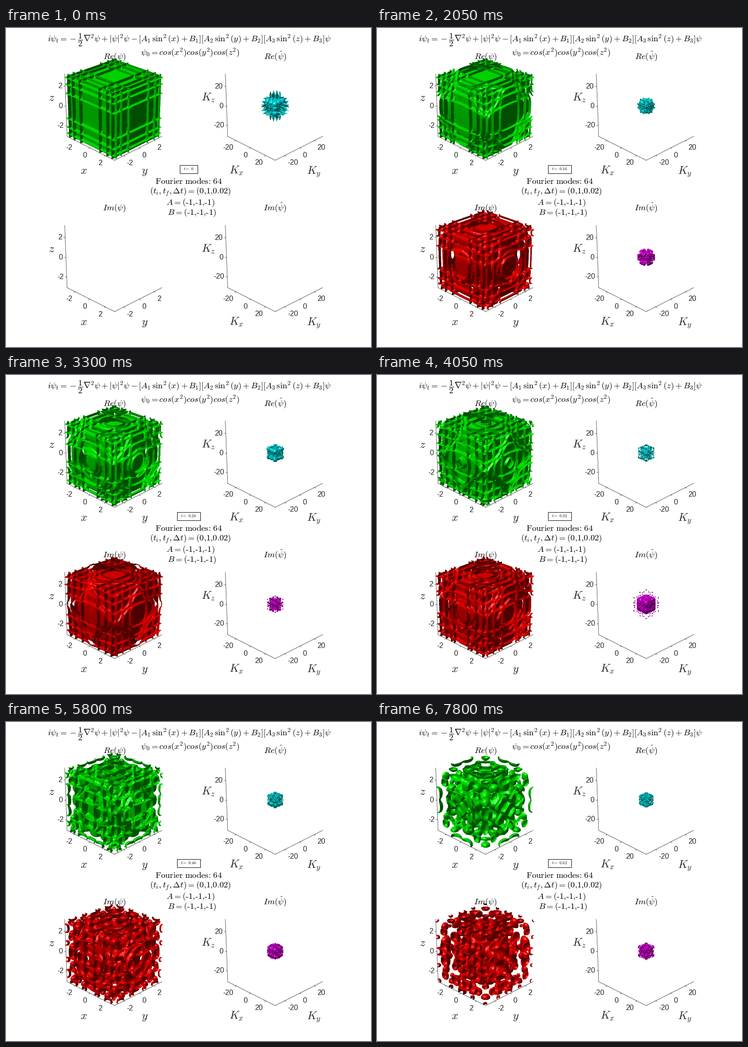
Animation, 800 px wide and 700 px high, one loop 8 s. Source, as a matplotlib script:

```python
import itertools
import numpy as np
import matplotlib.pyplot as plt
from matplotlib.animation import FuncAnimation
from matplotlib.patches import Rectangle

plt.rcParams["mathtext.fontset"] = "cm"
plt.rcParams["font.family"] = "Liberation Sans"

# ---------- wave equation on the even half grid ----------
N, H = 64, 32
STATES, DT, SUB = 32, 0.02, 2
k = np.fft.fftfreq(N, 1 / N)
x = np.arange(H + 1) * 2 * np.pi / N


def fold(m):
    """Restrict a matrix on N periodic points to even functions."""
    f = m[:H + 1, :H + 1].copy()
    f[:, 1:H] += m[:H + 1, :H:-1]
    return f


def apply3(m, a):
    for _ in range(3):
        a = np.tensordot(a, m, (0, 1))
    return a


def outer3(v):
    return v[:, None, None] * v[:, None] * v


step = DT / SUB
dft = np.fft.fft(np.eye(N))
kinetic = fold(np.fft.ifft(np.exp(-0.5j * k**2 * step)[:, None] * dft, axis=0))
fourier = fold(dft).real * ((-1.0) ** np.arange(H + 1))[:, None]
potential = outer3(1 + np.sin(x) ** 2)


def half_kick(psi):
    return psi * np.exp(-0.5j * step * (np.abs(psi) ** 2 + potential))


def advance(psi):
    for _ in range(SUB):
        psi = half_kick(apply3(kinetic, half_kick(psi)))
    return psi


# ---------- camera and light ----------
EL = np.radians(25)
S, C, R = np.sin(EL), np.cos(EL), np.sqrt(0.5)
DIST, FOCAL = 10 * np.sqrt(3), 1306
VIEW = np.array([[R, R, 0], [-S * R, S * R, C], [C * R, -C * R, S]], np.float32)
LIGHT = np.array([-0.065, -0.496, 0.866], np.float32)
EYE = VIEW[2]
LEFT, TOP, WIDE, TALL = 112, 112, 224, 240
SIGNS = np.array(list(itertools.product((-1, 1), repeat=3)), np.float32)[:, None]


def project(p):
    a, v, w = VIEW @ np.asarray(p, np.float32).T
    s = FOCAL / (DIST - w)
    return a * s, -v * s, w


# ---------- isosurfaces ----------
mirror = np.abs(np.arange(-H, H))


def isovalue(a):
    """Middle bar of the well filled part of a histogram."""
    full = a[np.ix_(mirror, mirror, mirror)].ravel()[::26]
    n, edges = np.histogram(full, 100)
    mid = (edges[1:] + edges[:-1]) / 2
    if n.argmax() < 2 and n[:2].max() > 10 * n.mean():
        n, mid = n[2:], mid[2:]
    small = n < n.max() / 50
    if small.sum() < 90:
        mid = mid[~small]
    return mid[max(len(mid) // 2 - 1, 0)]


def refine(a):
    for _ in range(3):
        b = np.empty((2 * len(a) - 1,) + a.shape[1:], np.float32)
        b[::2] = a
        b[1::2] = (a[1:] + a[:-1]) / 2
        a = np.moveaxis(b, 0, -1)
    return np.ascontiguousarray(a)


def crossings(a):
    """Points and normals where grid edges of one octant cut the surface."""
    level = np.float32(isovalue(a))
    padded = np.pad(a, ((1, 0),) * 3, "reflect")
    grads = [refine(g[1:, 1:, 1:]).ravel() for g in np.gradient(padded)]
    fine = refine(a)
    size = len(fine)
    above = fine > level
    flat = fine.ravel()
    points, normals = [], []
    for axis in range(3):
        cut = np.diff(above, axis=axis)
        pos = np.array(np.nonzero(cut))
        stride = size ** (2 - axis)
        lo = pos[0] * size * size + pos[1] * size + pos[2]
        f = (level - flat[lo]) / (flat[lo + stride] - flat[lo])
        p = pos.astype(np.float32)
        p[axis] += f
        points.append(p.T / (size - 1))
        normals.append(np.array([g[lo] + f * (g[lo + stride] - g[lo])
                                 for g in grads], np.float32).T)
    return np.concatenate(points), np.concatenate(normals)


def shade(n, color):
    n = n / (np.sqrt((n * n).sum(1, keepdims=True)) + 1e-20)
    facing = n @ EYE
    flip = np.where(facing < 0, -1, 1).astype(np.float32)
    facing = facing * flip
    lit = np.clip((n @ LIGHT) * flip, 0, 1)
    shine = np.clip(2 * lit * facing - LIGHT @ EYE, 0, 1) ** 10 * (lit > 0)
    rgb = (0.3 + 0.6 * lit)[:, None] * np.array(color, np.float32)
    return np.minimum(rgb + 0.45 * shine[:, None], 1)


def spread(b):
    """Grow every dot to 3 by 3, the nearest one winning."""
    for _ in range(2):
        c = b.copy()
        np.maximum(c[1:], b[:-1], out=c[1:])
        np.maximum(c[:-1], b[1:], out=c[:-1])
        b = c.T
    return b


def surface(a, color):
    if np.ptp(a) < 1e-9:
        return np.zeros((TALL, WIDE, 4), np.uint8)
    a = a.astype(np.float32)
    a = a / np.abs(a).max()
    p, n = crossings(a)
    p, n = ((SIGNS * q).reshape(-1, 3) for q in (p, n))
    keep = (p < 1 - 1 / H + 1e-4).all(1)
    p, n = p[keep], n[keep]
    u, v, w = project(p)
    col = ((u + LEFT) * 2).astype(np.int64)
    row = ((v + TOP) * 2).astype(np.int64)
    key = ((w + 1.8) * 18000).astype(np.uint16)
    order = np.argsort(key, kind="stable")
    buf = np.zeros(4 * TALL * WIDE, np.int64)
    buf[(row * 2 * WIDE + col)[order]] = (key[order].astype(np.int64) << 32) | (order + 1)
    ids = spread(buf.reshape(2 * TALL, 2 * WIDE)) & 0xFFFFFFFF
    table = np.zeros((len(p) + 1, 4), np.float32)
    table[1:, :3] = shade(n, color)
    table[1:, 3] = 1
    big = table[ids]
    img = big[::2, ::2] + big[1::2, ::2] + big[::2, 1::2] + big[1::2, 1::2]
    img[..., :3] /= np.maximum(img[..., 3:], 1)
    img[..., 3] /= 4
    return (img * 255 + 0.5).astype(np.uint8)


GREEN, CYAN, RED, MAGENTA = (0, 1, 0), (0, 1, 1), (1, 0, 0), (1, 0, 1)


def simulate():
    psi = outer3(np.cos(x**2)).astype(complex)
    out = []
    for i in range(STATES):
        hat = apply3(fourier, psi)
        out.append([surface(psi.real, GREEN), surface(hat.real, CYAN),
                    surface(psi.imag, RED), surface(hat.imag, MAGENTA)])
        psi = advance(psi)
    return out


# ---------- stage ----------
fig = plt.figure(figsize=(8, 7), dpi=100, facecolor="white")
ax = fig.add_axes([0, 0, 1, 1])
ax.set_xlim(0, 800)
ax.set_ylim(700, 0)
ax.axis("off")
GREY = "#262626"


def text(px, py, s, size=18.67, ha="center", color="black"):
    return ax.text(px, py, s, fontsize=size * 0.72, ha=ha, va="baseline",
                   color=color, zorder=5)


def line(cx, cy, ends):
    u, v, _ = project(ends)
    ax.plot(cx + u, cy + v, color=GREY, lw=0.55, zorder=1)
    return cx + u[0], cy + v[0]


def panel(cx, cy, title, names, limit, tick):
    for ends in ([(-1, -1, 1), (-1, -1, -1)], [(-1, -1, -1), (1, -1, -1)],
                 [(1, -1, -1), (1, 1, -1)]):
        line(cx, cy, ends)
    for value in (-tick, 0, tick):
        q = value / limit
        px, py = line(cx, cy, [(q, -1, -1), (q, -1.05, -1)])
        text(px - 6.5, py + 20.5, str(value), 16, "right", GREY)
        px, py = line(cx, cy, [(1, q, -1), (1.05, q, -1)])
        text(px + 6.5, py + 20.5, str(value), 16, "left", GREY)
        px, py = line(cx, cy, [(-1, -1, q), (-1, -1.05, q)])
        text(px - 7, py + 5, str(value), 16, "right", GREY)
    text(cx, cy - 103, title)
    places = [(-68, 149), (66 if limit < 10 else 85, 149),
              (-138 if limit < 10 else -147, -11)]
    if limit > 10:
        places[0] = (-85, 149)
    for name, (dx, dy) in zip(names, places):
        text(cx + dx, cy + dy, f"${name}$", 24.5, color=GREY)
    return ax.imshow(np.zeros((TALL, WIDE, 4), np.uint8), interpolation="nearest",
                     aspect="auto", zorder=2,
                     extent=(cx - LEFT, cx - LEFT + WIDE, cy - TOP + TALL, cy - TOP))


images = []
for cy, part in ((171, "Re"), (503, "Im")):
    images.append(panel(238, cy, rf"${part}(\psi)$", "xyz", np.pi, 2))
    images.append(panel(590, cy, rf"${part}(\hat{{\psi}})$",
                        ("K_x", "K_y", "K_z"), H, 20))
ax.set_xlim(0, 800)
ax.set_ylim(700, 0)

text(401.5, 29, r"$i\psi_t=-\dfrac{1}{2}\nabla^2\psi+|\psi|^2\psi"
     r"-[A_1\,\sin^2(x)+B_1][A_2\,\sin^2(y)+B_2][A_3\,\sin^2(z)+B_3]\psi$")
text(404, 60, r"$\psi_0=cos(x^2)cos(y^2)cos(z^2)$")
text(401, 342.5, r"$\text{Fourier}\ \text{modes:}\ \text{64}$")
text(404, 365, r"$(t_i,t_f,\Delta t)=\text{(0,1,0.02)}$")
text(404.5, 388, r"$A=\text{(-1,-1,-1)}$")
text(407.5, 410.5, r"$B=\text{(-1,-1,-1)}$")

boxes = [ax.add_patch(Rectangle((374.5, 300.5), 51, 18, fc="white", ec="black",
                                lw=0.72, zorder=4)) for _ in range(2)]
clock = text(400, 312, "", 9.33)
pictures = simulate()


def update(frame):
    i = max(0, (frame - 1) // 5)
    for im, data in zip(images, pictures[i]):
        im.set_data(data)
    label = f"{i * DT:.2f}".rstrip("0").rstrip(".")
    clock.set_text(rf"$t=\ {label}$")
    width = {1: 39, 3: 45}.get(len(label), 51)
    boxes[0].set_visible(i > 0)
    boxes[1].set_x(400 - width / 2)
    boxes[1].set_width(width)
    return [*images, *boxes, clock]


anim = FuncAnimation(fig, update, frames=160, interval=50, repeat=True,
                     repeat_delay=0, blit=False)
plt.show()
```
